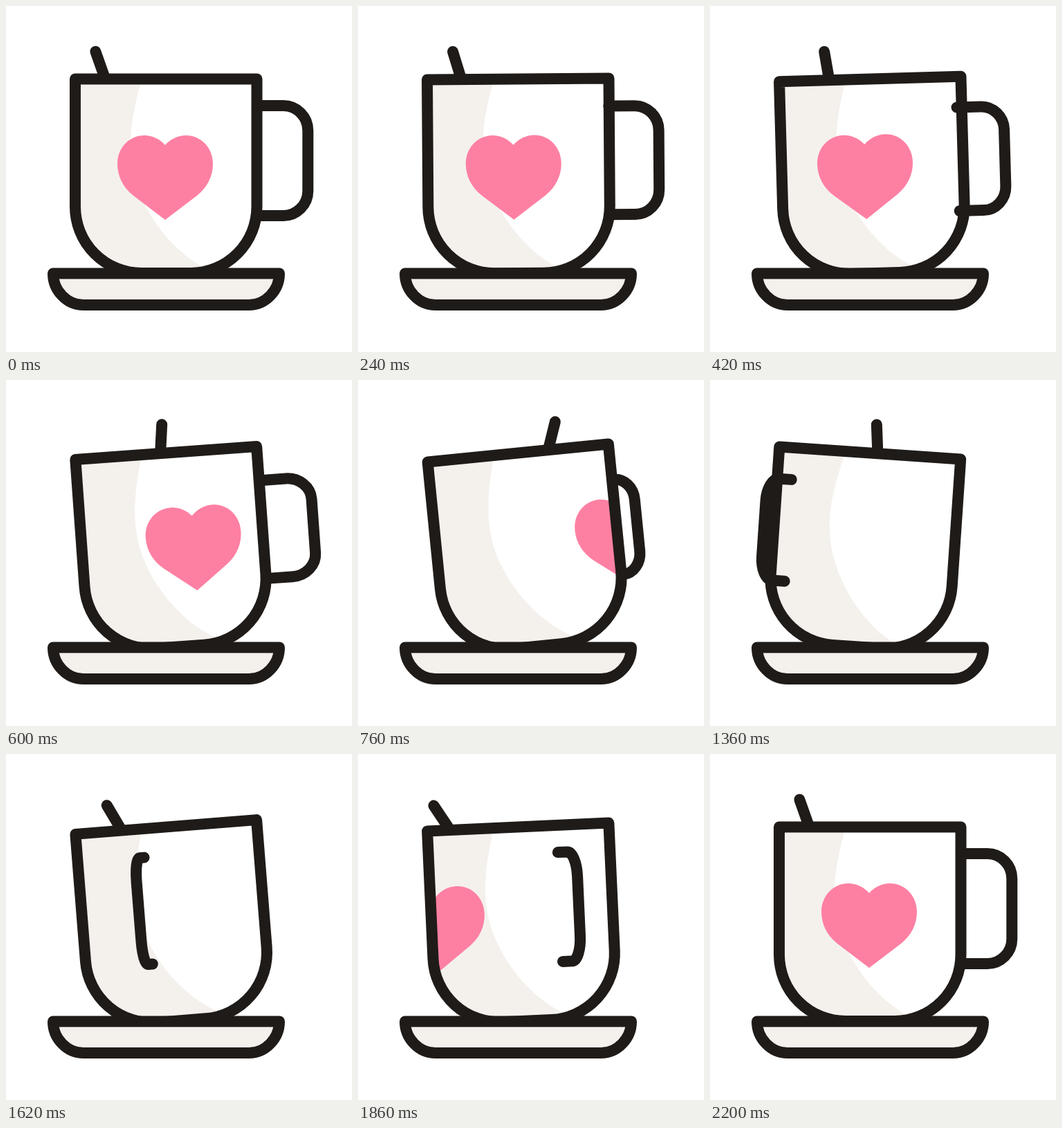
These frames come from a looping animation (500 px wide and 500 px high, 2400 ms). An HTML page:

```html
<!DOCTYPE html>
<html lang="en">
<head>
<meta charset="utf-8">
<title>Turning cup</title>
<style>
  html, body { margin: 0; width: 100%; height: 100%; overflow: hidden; background: #fff; }
  svg { display: block; width: 100%; height: 100%; }
  .line { fill: none; stroke: #1f1b18; stroke-width: 16; stroke-linecap: round; stroke-linejoin: round; }
</style>
</head>
<body>
<svg viewBox="0 0 500 500">
  <defs>
    <path id="body" d="M100 105.5H362.5V290A96 96 0 0 1 266.5 386H196A96 96 0 0 1 100 290Z"/>
    <clipPath id="inside"><use href="#body"/></clipPath>
  </defs>
  <g id="cup">
    <path id="spoon" class="line"/>
    <path id="handleBack" class="line"/>
    <use href="#body" fill="#fff"/>
    <g clip-path="url(#inside)">
      <path fill="#f4f1ed" d="M92 100H198C174 180 175 225 193 270C211 315 246 358 290 380V395H92Z"/>
      <path id="heart" fill="#fd80a2" d="M230 201C222 192 211 187 200 187C178 187 161 205 161 228C161 246 169 262 184 274L230 309L276 274C291 262 299 246 299 228C299 205 282 187 260 187C249 187 238 192 230 201Z"/>
    </g>
    <use href="#body" class="line"/>
    <path id="handleFront" class="line"/>
  </g>
  <path class="line" style="fill:#f4f0ec" d="M68 386.4H395C395 411 375 432 351 432H112C88 432 68 411 68 386.4Z"/>
</svg>
<script>
const LOOP = 2400, STEP = 20, BEGIN = 100, END = 2200;
const PIVOT = { x: 231.3, y: 105.7 };
const el = id => document.getElementById(id);
const sin = deg => Math.sin(deg * Math.PI / 180);
const cos = deg => Math.cos(deg * Math.PI / 180);

// Key poses: time in ms, then degrees of cup tilt, handle turn and spoon stir.
const poses = [
  [BEGIN, 0, 0, 0],
  [420, -1.6, -20, 26],
  [760, -5.7, 37, 96],
  [1100, -1.7, 142, 160],
  [1360, 3.9, 213, 222],
  [1680, -5.4, 264, 283],
  [1860, -2.6, 295, 311],
  [END, 0, 360, 360]
];

// Smooth interpolation that never overshoots its keys and rests at both ends.
function poseAt(t) {
  const last = poses.length - 1;
  const i = Math.min(last, poses.findIndex(p => p[0] >= t)) - 1;
  if (t <= BEGIN) return poses[0].slice(1);
  if (t >= END) return poses[last].slice(1);
  const [a, b] = [poses[i], poses[i + 1]];
  const span = b[0] - a[0], u = (t - a[0]) / span, v = 1 - u;
  const secant = (j, c) => (poses[j + 1][c] - poses[j][c]) / (poses[j + 1][0] - poses[j][0]);
  const slope = (j, c) => {
    if (j === 0 || j === last) return 0;
    const before = secant(j - 1, c), after = secant(j, c);
    return before * after > 0 ? 2 * before * after / (before + after) : 0;
  };
  return [1, 2, 3].map(c =>
    a[c] * v * v * (1 + 2 * u) + b[c] * u * u * (1 + 2 * v)
    + span * u * v * (slope(i, c) * v - slope(i + 1, c) * u));
}

// The handle orbits the cup and looks shallower on the far side.
function drawHandle(turn, squash) {
  const xa = PIVOT.x + 132 * cos(turn);
  const xo = PIVOT.x + (188 + 17 * cos(turn)) * cos(turn);
  const scale = 1 - .14 * squash, middle = 223.5 + 3 * squash;
  const top = middle - 79.5 * scale, bottom = middle + 79.5 * scale;
  const rx = (xo - xa) * .486, ry = 36 * scale, k = .448;
  const d = `M${xa} ${top}H${xo - rx}C${xo - rx * k} ${top} ${xo} ${top + ry * k} ${xo} ${top + ry}` +
    `V${bottom - ry}C${xo} ${bottom - ry * k} ${xo - rx * k} ${bottom} ${xo - rx} ${bottom}H${xa}`;
  const behind = sin(turn) > 0;
  el('handleBack').setAttribute('d', behind ? d : '');
  el('handleFront').setAttribute('d', behind ? '' : d);
}

// A stick of fixed length whose tip follows a flat circle.
function drawSpoon(stir) {
  const angle = stir + 36.4;
  const tip = -15 - 108 * cos(angle);
  const lean = .15 * tip + 5 * sin(angle);
  const height = Math.sqrt(37 * 37 - lean * lean);
  el('spoon').setAttribute('d',
    `M${PIVOT.x + tip} ${PIVOT.y - 5 - height}L${PIVOT.x + tip - lean} ${PIVOT.y - 5}`);
}

// Leaves to the right after a small wind-up, then slows in from the left.
function drawHeart(u, squash) {
  const x = u < .5 ? 11300 * u * u * (u - .188) : -1870 * (1 - u) ** 1.5;
  el('heart').setAttribute('transform', `translate(${x} ${-3 * squash})`);
}

function draw(t) {
  const u = Math.min(1, Math.max(0, (t - BEGIN) / (END - BEGIN)));
  const squash = Math.abs(sin(180 * u ** .7)) ** 3;
  const [tilt, turn, stir] = poseAt(t);
  el('cup').setAttribute('transform', `rotate(${tilt} ${PIVOT.x} ${PIVOT.y})`);
  drawHandle(turn, squash);
  drawSpoon(stir);
  drawHeart(u, squash);
}

const start = performance.now();
function frame(now) {
  const t = Math.max(0, now - start) % LOOP;
  draw(Math.floor(t / STEP) * STEP);
  requestAnimationFrame(frame);
}
draw(0);
requestAnimationFrame(frame);
</script>
</body>
</html>
```
